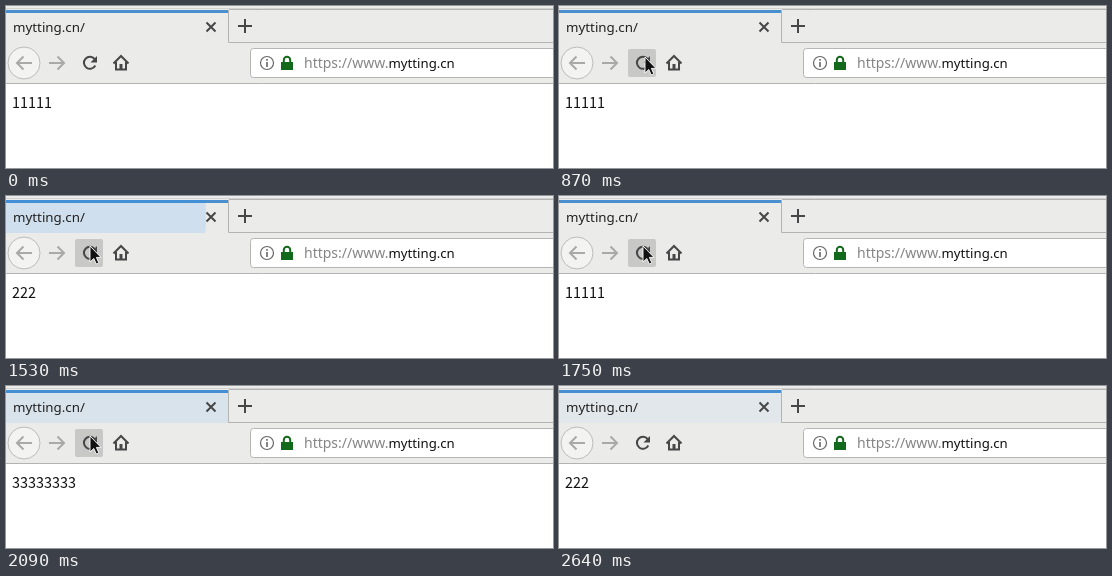
An HTML page that plays this animation: 547 px wide and 162 px high, repeating every 3080 ms.

```html
<!DOCTYPE html>
<html lang="en">
<head>
<meta charset="utf-8">
<title>Browser reload</title>
<style>
  html, body { margin: 0; width: 100%; height: 100%; overflow: hidden; background: #fff; }
  svg { display: block; width: 547px; height: 162px; }
  text { font-family: "Noto Sans", "Open Sans", sans-serif; white-space: pre; }
  #page { font: 300 14.4px "Noto Sans CJK SC", "Noto Sans CJK JP", "Noto Sans CJK", sans-serif; }
  .icon { fill: none; stroke: #474747; stroke-width: 2; }
  .dim { stroke: #a9a9a8; }
</style>
</head>
<body>
<svg viewBox="0 0 547 162">
  <defs>
    <clipPath id="tab"><path d="M0 4H222V37H0Z"/></clipPath>
    <path id="arrow" d="M0 0V16L3.8 12.5 6.3 18 8.8 16.9 6.4 11.4H11Z" fill="#111" stroke="#fff" stroke-width=".9"/>
    <path id="hand" d="M5 15V3a1.8 1.8 0 0 1 3.6 0V9.5q2-1 3 .8 2-.8 2.6 1 2.3-.3 2.3 2V18l-2 3.5V24H7v-2.5L1.5 14.5q-.6-2 1-2.3ZM8.6 9.5V13M11.6 10.5V13.5M14.2 11.5V14" fill="#fff" stroke="#1b1b25" stroke-width="1.3" stroke-linejoin="round"/>
  </defs>

  <path d="M0 0H547V77H0Z" fill="#ebebea"/>
  <path d="M0 2.5H547" stroke="#d2d2d1"/>
  <path d="M223 3.5H547M222.5 4V36.5H547M0 77.5H547" fill="none" stroke="#b3b3b1"/>
  <path d="M0 4H222V7H0Z" fill="#4a90d0"/>
  <circle id="burst" cx="8" cy="21" fill="#0a84ff" clip-path="url(#tab)"/>
  <text x="7" y="26" font-size="13.33" fill="#222">mytting.cn/</text>
  <path class="icon" d="M200.5 16.5l9 9m0-9l-9 9" stroke-width="1.8"/>
  <path class="icon" d="M232 20H246M239 13V27"/>

  <circle cx="18" cy="57" r="16" fill="#f3f3f2" stroke="#bcbcbb"/>
  <path class="icon dim" d="M26 57H11M17.5 50.5L11 57l6.5 6.5"/>
  <path class="icon dim" d="M43 57H58M51.5 50.5L58 57l-6.5 6.5"/>
  <rect id="hover" x="69" y="43" width="28" height="28" rx="2" fill="#c8c8c7"/>
  <path class="icon" d="M88.6 53A6 6 0 1 0 89.3 59.5"/>
  <path d="M91 50V56.5H84.5Z" fill="#474747"/>
  <path class="icon" d="M107.5 57.5L115 50l7.5 7.5M110 56V63.5H120V56"/>
  <path d="M113.5 58H116.5V63H113.5Z" fill="#474747"/>

  <rect x="244.5" y="42.5" width="320" height="29" rx="3" fill="#fff" stroke="#b5b5b4"/>
  <circle class="icon" cx="261" cy="57" r="6.5" style="stroke:#666;stroke-width:1.2"/>
  <path d="M261 56V61M261 53V54.7" stroke="#666" stroke-width="1.6"/>
  <path d="M275 56H287V64H275Z" fill="#12691b"/>
  <path d="M277.8 57V54a3.2 3.2 0 0 1 6.4 0V57" fill="none" stroke="#12691b" stroke-width="2"/>
  <text x="298" y="62" font-size="14" fill="#858585">https://www.</text>
  <text x="382.5" y="62" font-size="13.2" fill="#111">mytting.cn</text>

  <text id="page" x="6" y="102" fill="#111"></text>
  <use id="cursor"/>
</svg>
<script>
  const LOOP = 3080;
  const BURST_SPEED = 0.7, BURST_REACH = 290;
  const $ = id => document.getElementById(id);

  // Each track lists [start in ms, value...]; a value holds until the next start.
  const pages = [[0, "11111"], [1310, "222"], [1750, "11111"], [2090, "33333333"], [2310, "222"]];
  const cursors = [
    [0],
    [100, "hand", 383, 136], [210, "hand", 342, 117], [320, "hand", 280, 96],
    [430, "hand", 203.5, 76.5], [540, "hand", 121.5, 62],
    [650, "arrow", 107, 56], [760, "arrow", 93, 53], [870, "arrow", 86, 51], [980, "arrow", 84, 50],
    [2420, "arrow", 371, 121], [2530, "arrow", 505, 143], [2640]
  ];
  const hovers = [[0, false], [760, true], [2420, false]];
  const bursts = [
    [0, 0], [1310, 46], [1420, 123], [1530, 200], [1640, 277], [1750, 0],
    [1870, 76], [1980, 153], [2090, 230], [2190, 0],
    [2310, 31], [2420, 108], [2530, 108 + 110 * BURST_SPEED], [2640, 108 + 220 * BURST_SPEED]
  ];

  const at = (track, time) => track.findLast(([start]) => start <= time).slice(1);

  function draw(now) {
    const time = now % LOOP;
    $("page").textContent = at(pages, time)[0];
    $("hover").style.display = at(hovers, time)[0] ? "" : "none";

    const [reach] = at(bursts, time);
    $("burst").setAttribute("r", Math.max(0, reach - 8));
    $("burst").setAttribute("opacity", 0.4 * (1 - reach / BURST_REACH));

    const [shape, x, y] = at(cursors, time);
    $("cursor").style.display = shape ? "" : "none";
    if (shape) {
      $("cursor").setAttribute("href", "#" + shape);
      $("cursor").setAttribute("transform", `translate(${x} ${y})`);
    }
  }

  const begin = performance.now();
  function tick() {
    draw(performance.now() - begin);
    requestAnimationFrame(tick);
  }
  tick();
</script>
</body>
</html>
```
